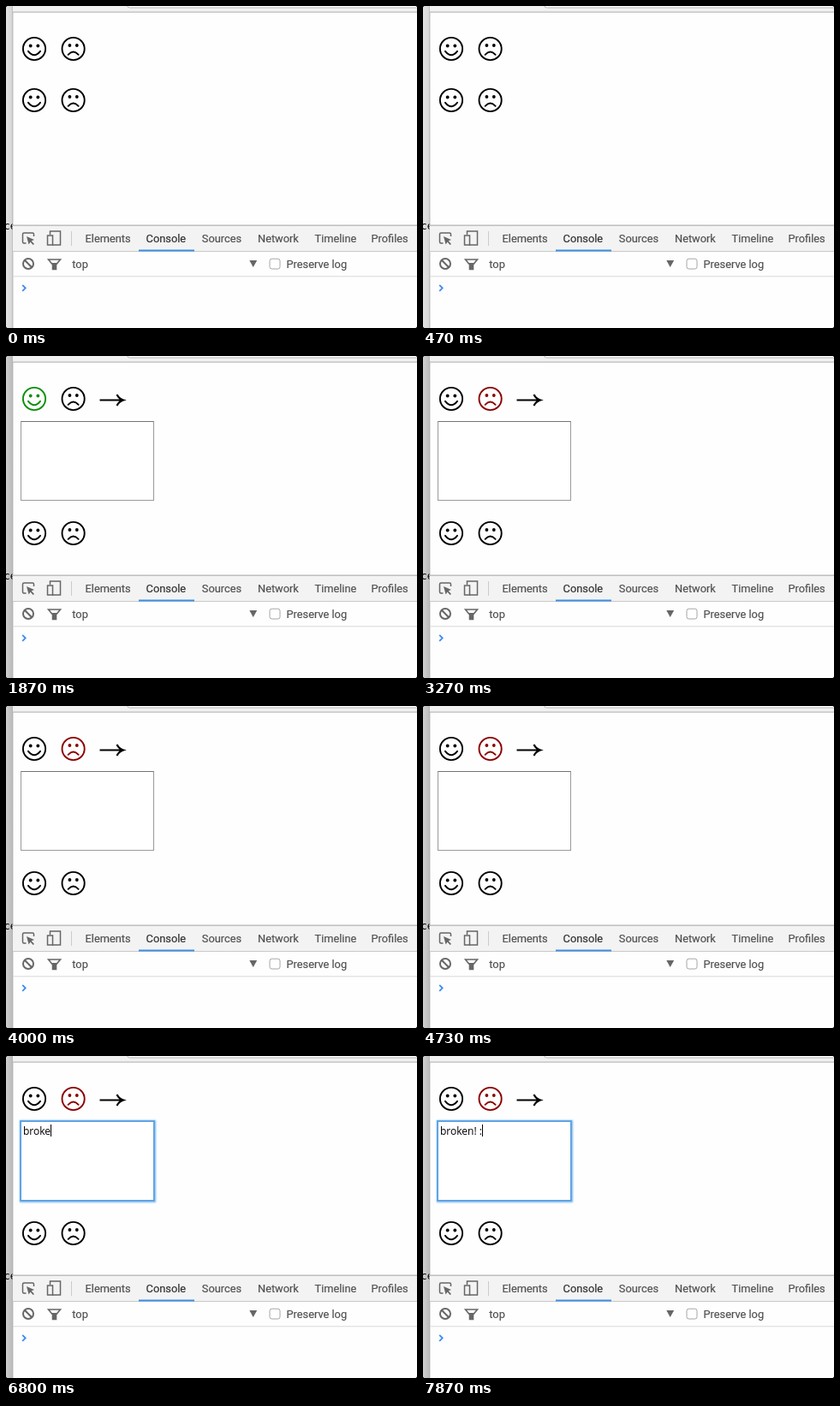
Animation, 480 px wide and 376 px high, one loop 8 s. Source, as an HTML page:

```html
<!DOCTYPE html>
<html lang="en">
<head>
<meta charset="utf-8">
<title>Feedback form</title>
<style>
html, body { margin: 0; width: 100%; height: 100%; overflow: hidden; background: #000; }
#stage { position: relative; width: 480px; height: 376px; overflow: hidden; border-radius: 3px; background: #fefefe; }
svg { position: absolute; left: 0; top: 0; display: block; }
.ui { font: 12.8px Roboto, "Liberation Sans", sans-serif; fill: #505050; stroke: #505050; stroke-width: .2; }
.ui .on { fill: #303030; stroke: #303030; }
.line { fill: none; stroke: #666; }
.face { fill: none; stroke: currentColor; stroke-width: 1.9; stroke-linecap: round; }
.dot { fill: currentColor; stroke: none; }
#field {
  position: absolute; left: 16.5px; top: 76px; width: 154px; height: 91px;
  border: 1px solid #9a9a9a; border-top-color: #757575; background: #fff;
  font: 12px/15px "Open Sans", "Noto Sans", sans-serif; color: #000;
}
#field.focus { border-color: #5a9fe0; box-shadow: 0 0 0 1px #66a9e8, 0 0 2px 1.5px #7db8ee; }
#typed { position: absolute; left: 2.5px; top: 3px; white-space: pre; }
#caret { display: inline-block; width: 1px; height: 14px; background: #000; vertical-align: top; }
</style>
</head>
<body>
<div id="stage">
<svg width="480" height="376" viewBox="0 0 480 376">
  <defs>
    <linearGradient id="idle"><stop stop-color="#e2e2e2"/><stop offset="1" stop-color="#d4d4d4"/></linearGradient>
    <linearGradient id="active"><stop stop-color="#d0d0d0"/><stop offset="1" stop-color="#b9b9b9"/></linearGradient>
    <g id="smile" class="face">
      <circle r="13.1"/>
      <circle class="dot" cx="-4.3" cy="-3.5" r="1.9"/><circle class="dot" cx="4.3" cy="-3.5" r="1.9"/>
      <path d="M-7 2.8Q0 11.6 7 2.8"/>
    </g>
    <g id="sad" class="face">
      <circle r="13.1"/>
      <circle class="dot" cx="-4.2" cy="-4" r="1.9"/><circle class="dot" cx="4.2" cy="-4" r="1.9"/>
      <path d="M-6 6.8Q0 .2 6 6.8"/>
    </g>
  </defs>

  <rect id="edge" width="8" height="376" fill="url(#idle)"/>
  <text x="-2.6" y="261" font-family="DejaVu Sans Mono, monospace" font-size="12">ce</text>
  <rect x="8" width="472" height="376" fill="#fefefe"/>
  <rect x="7.4" width="1" height="376" fill="#b4b4b4"/>
  <rect x="8" width="472" height="7" fill="#f1f1f1"/>
  <rect x="141.5" y="-10" width="360" height="12" rx="3" fill="#fff" stroke="#b4b4b4"/>
  <rect x="8" y="6.6" width="472" height="1" fill="#acacac"/>

  <use id="happy" href="#smile" x="33" y="50"/>
  <use id="upset" href="#sad" x="78.6" y="50"/>
  <path id="arrow" d="M109.5 51.5H136M129.5 45Q132 50 137 51.5Q132 53 129.5 58" fill="none" stroke="#000" stroke-width="2.2"/>
  <g id="second">
    <use href="#smile" x="33"/>
    <use href="#sad" x="78.6"/>
  </g>

  <rect x="8" y="256" width="472" height="30" fill="#f3f3f3"/>
  <rect x="8" y="255.6" width="472" height="1" fill="#a0a0a0"/>
  <rect x="8" y="286" width="472" height="1" fill="#c8c8c8"/>
  <rect x="8" y="315.3" width="472" height="1" fill="#d9d9d9"/>
  <rect x="155" y="284.5" width="65" height="2" fill="#3f8fe3"/>
  <rect x="76" y="263" width="1" height="17" fill="#ccc"/>

  <g class="line" stroke-width="1.5">
    <path d="M23.5 277H21Q19.5 277 19.5 275.5V266.5Q19.5 265 21 265H31Q32.5 265 32.5 266.5V269"/>
    <path d="M24 269L33 273L29.7 274.3L33 278L31.6 279L28.5 275.5L26.6 278.5Z" fill="#666" stroke="none"/>
    <path d="M51.5 267V263H63.5V279H54"/>
    <rect x="48.5" y="268" width="6" height="11"/>
    <path d="M49.5 296H63.5L58.5 302V307.5H54.5V302Z" stroke-width="1.6"/>
    <path d="M52.5 300H60.5L58.5 302V307.5H54.5V302Z" fill="#666" stroke="none"/>
    <g stroke-width="2"><circle cx="26" cy="301" r="6"/><path d="M21.8 296.8L30.2 305.2"/></g>
  </g>
  <path d="M284.3 297H293.2L288.7 305Z" fill="#666"/>
  <rect x="308" y="295.2" width="12" height="11.8" rx="2.5" fill="#fff" stroke="#a5a5a5"/>
  <path d="M19.2 325.8L22.7 329.3L19.2 332.8" fill="none" stroke="#3d8bf0" stroke-width="1.8"/>

  <g class="ui">
    <text x="92.6" y="276.4">Elements</text>
    <text class="on" x="163.6" y="276.4">Console</text>
    <text x="228.8" y="276.4">Sources</text>
    <text x="294" y="276.4">Network</text>
    <text x="360.5" y="276.4">Timeline</text>
    <text x="426.5" y="276.4">Profiles</text>
    <text x="77.3" y="306">top</text>
    <text x="327.5" y="306">Preserve log</text>
  </g>
</svg>
<div id="field"><div id="typed"><span id="words"></span><span id="caret"></span></div></div>
</div>
<script>
const LOOP = 8000, ACTIVATE = 870, OPEN = 1000, SWITCH = 2600, FOCUS = 4870;
const MESSAGE = 'broken! :';
const KEYS = [5730, 6130, 6400, 6600, 6800, 7000, 7270, 7530, 7800];
const $ = id => document.getElementById(id);
const show = (id, on) => { $(id).style.visibility = on ? 'visible' : 'hidden'; };

function draw(t) {
  const open = t >= OPEN, sad = t >= SWITCH, focus = t >= FOCUS;
  const count = KEYS.filter(k => t >= k).length;
  const lastInput = count ? KEYS[count - 1] : FOCUS;

  $('edge').setAttribute('fill', t >= ACTIVATE ? 'url(#active)' : 'url(#idle)');
  $('happy').style.color = open && !sad ? '#0a8f0a' : '#000';
  $('upset').style.color = sad ? '#8b0000' : '#000';
  $('second').setAttribute('transform', `translate(0 ${open ? 207 : 110})`);
  show('arrow', open);
  show('field', open);
  $('field').classList.toggle('focus', focus);
  $('words').textContent = MESSAGE.slice(0, count);
  // the caret blinks only while no key is pressed
  show('caret', focus && (t - lastInput) % 1000 < 500);
}

function tick() {
  draw(performance.now() % LOOP);
  requestAnimationFrame(tick);
}
tick();
</script>
</body>
</html>
```
